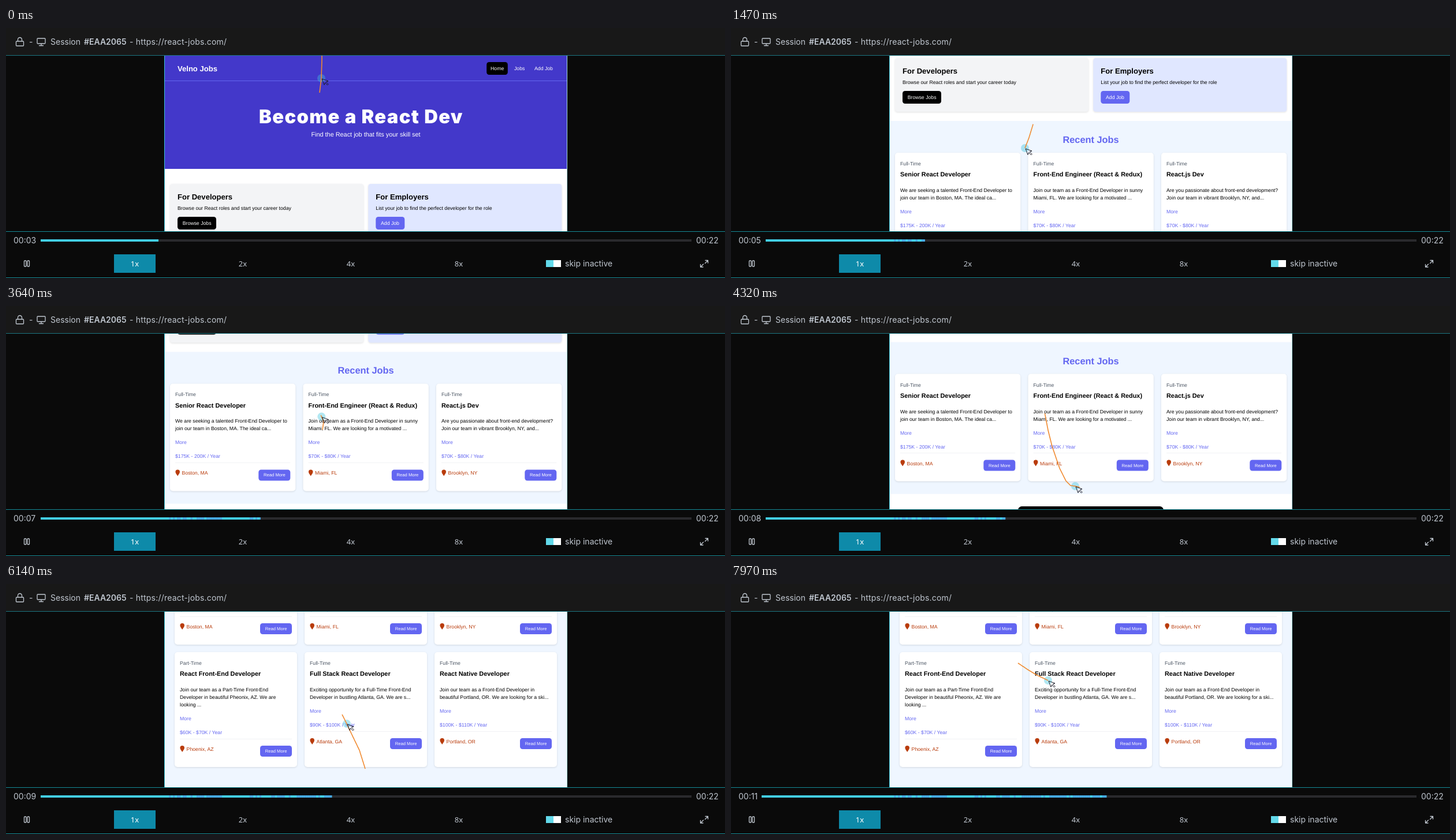
An HTML page for the animation above (8 s loop, 1245 px wide and 433 px high).

```html
<!DOCTYPE html>
<html lang="en">
<head>
<meta charset="utf-8">
<title>Session replay</title>
<style>
html, body { margin: 0; width: 100%; height: 100%; overflow: hidden; background: #0a0a0a; }
svg { display: block; width: 1245px; height: 433px; }
text { white-space: pre; }
.page text { font-family: "Liberation Sans", Arial, sans-serif; text-rendering: geometricPrecision; }
.ui text { font-family: Inter, sans-serif; font-size: 14px; fill: #c0c7d0; }
.ui .speed { font-family: "Noto Sans", sans-serif; font-size: 13px; text-anchor: middle; }
.icon { fill: none; stroke: #c0c7d0; stroke-width: 1.3; stroke-linecap: round; stroke-linejoin: round; }
.card { filter: drop-shadow(0 1.5px 1.5px rgba(0,0,0,.12)); }
</style>
</head>
<body>
<svg id="stage" viewBox="0 0 1245 433"></svg>
<script>
const REM = 8.71, LOOP = 8000, STEP = 70;
const INDIGO = '#6366f1', PURPLE = '#4338ca', SKY = '#eff6ff', RUST = '#b93c0c', TEAL = '#148a96';

const rect = (x, y, w, h, fill, r = 0, extra = '') =>
  `<rect x="${x}" y="${y}" width="${w}" height="${h}" rx="${r}" fill="${fill}" ${extra}/>`;
const text = (x, y, s, size = REM, fill = '#000', extra = '') =>
  `<text x="${x}" y="${y}" font-size="${size}" fill="${fill}" ${extra}>${s.replace(/&/g, '&amp;')}</text>`;
const bold = 'font-weight="700"', mid = 'text-anchor="middle"';
const label = (x, y, s, extra) => `<text x="${x}" y="${y}" ${extra || ''}>${s}</text>`;
const icon = d => `<path class="icon" d="${d}"/>`;

function nav(active) {
  const links = [['Home', 839, 23.2], ['Jobs', 880, 18.2], ['Add Job', 915, 32.5]];
  return rect(275, 48, 697, 43.5, PURPLE) + rect(275, 91, 697, 1, INDIGO) +
    text(297, 75, 'Velno Jobs', 13.07, '#fff', bold) +
    links.map(([s, x, w], i) =>
      (i === active ? rect(x - 6.8, 59, w + 13.4, 22, '#000', 4.4) : '') +
      text(x, 73, s, REM, '#fff')).join('');
}

function promo(x, fill, title, line, button, w, color) {
  return rect(x, 270, 335, 93, fill, 4.4, 'class="card"') +
    text(x + 13, 297, title, 13.07, '#000', bold) +
    text(x + 13, 314.7, line) +
    rect(x + 13, 327, w, 22, color, 4.4) +
    text(x + 21.7, 341, button, REM, '#fff');
}

function job(x, y, w, h, { type, title, lines, pay, place }) {
  const px = x + 9, right = x + w - 9, dy = (lines.length - 2) * 13;
  return rect(x, y, w, h, '#fff', 5, 'class="card"') +
    text(px, y + 22, type, REM, '#4b5563') +
    text(px, y + 41.3, title, 10.89, '#000', bold) +
    lines.map((s, i) => text(px, y + 68 + i * 13, s)).join('') +
    text(px, y + 105, 'More', REM, INDIGO, `transform="translate(0 ${dy})"`) +
    text(px, y + 129, pay, REM, INDIGO, `transform="translate(0 ${dy})"`) +
    rect(px, y + 137 + dy, w - 18, .6, '#e8eaee') +
    `<path transform="translate(${px + 4.2} ${y + 154 + dy})" fill="${RUST}" d="M0 6C-1.6 3.4-3.8 1.2-3.8-1.2A3.8 3.8 0 0 1 3.8-1.2C3.8 1.2 1.6 3.4 0 6Z"/>` +
    text(px + 11.6, y + 158 + dy, place, REM, RUST) +
    rect(right - 55, y + 149 + dy, 55, 19, INDIGO, 4.4) +
    text(right - 46.2, y + 161 + dy, 'Read More', 7.62, '#fff');
}

const entry = (type, title, lines, pay, place) => ({ type, title, lines, pay, place });
const recent = [
  entry('Full-Time', 'Senior React Developer',
    ['We are seeking a talented Front-End Developer to', 'join our team in Boston, MA. The ideal ca...'],
    '$175K - 200K / Year', 'Boston, MA'),
  entry('Full-Time', 'Front-End Engineer (React & Redux)',
    ['Join our team as a Front-End Developer in sunny', 'Miami, FL. We are looking for a motivated ...'],
    '$70K - $80K / Year', 'Miami, FL'),
  entry('Full-Time', 'React.js Dev',
    ['Are you passionate about front-end development?', 'Join our team in vibrant Brooklyn, NY, and...'],
    '$70K - $80K / Year', 'Brooklyn, NY')
];
const older = [
  entry('Part-Time', 'React Front-End Developer',
    ['Join our team as a Part-Time Front-End', 'Developer in beautiful Pheonix, AZ. We are', 'looking ...'],
    '$60K - $70K / Year', 'Phoenix, AZ'),
  entry('Full-Time', 'Full Stack React Developer',
    ['Exciting opportunity for a Full-Time Front-End', 'Developer in bustling Atlanta, GA. We are s...'],
    '$90K - $100K / Year', 'Atlanta, GA'),
  entry('Full-Time', 'React Native Developer',
    ['Join our team as a Front-End Developer in', 'beautiful Portland, OR. We are looking for a ski...'],
    '$100K - $110K / Year', 'Portland, OR')
];

const homePage = rect(275, 48, 697, 700, '#fff') + rect(275, 91, 697, 153, PURPLE) + nav(0) +
  text(438, 165, 'Become a React Dev', 32.67, '#fff',
    'style="font-family:Inter,sans-serif;font-weight:900;letter-spacing:1.4px"') +
  text(623, 187.7, 'Find the React job that fits your skill set', 10.89, '#fff', mid) +
  promo(284, '#f3f4f6', 'For Developers', 'Browse our React roles and start your career today', 'Browse Jobs', 67, '#000') +
  promo(627.3, '#e0e7ff', 'For Employers', 'List your job to find the perfect developer for the role', 'Add Job', 50, INDIGO) +
  rect(275, 379, 697, 263, SKY) +
  text(623, 417, 'Recent Jobs', 16.33, INDIGO, bold + ' ' + mid) +
  recent.map((j, i) => job(284 + i * 230.5, 434, 217.3, 186, j)).join('') +
  rect(497, 663.5, 252, 30.5, '#000', 6.5, 'id="viewAll"') +
  text(623, 682, 'View All Jobs', REM, '#fff', mid);

const jobsPage = rect(275, 48, 697, 600, SKY) + nav(1) +
  text(623, 129, 'Browse Jobs', 16.33, INDIGO, bold + ' ' + mid) +
  recent.map((j, i) => job(292 + i * 225, 146, 212, 186, j)).join('') +
  older.map((j, i) => job(292 + i * 225, 345, 212, 199, j)).join('');

// Event marks along the timeline, with one quiet stretch
let marks = '';
for (let i = 0; i < 110; i++) {
  const x = 279 + i * 3.4, r = Math.abs(Math.sin(i * 12.9898) * 43758.5453) % 1;
  if (r > .4 && (x < 373 || x > 421)) marks += rect(x, 366, 3, 4, '#4a8fe0', 0, 'opacity=".65"');
}

document.getElementById('stage').innerHTML = `
<defs>
  <clipPath id="view"><rect x="275" y="48" width="697" height="304"/></clipPath>
  <clipPath id="played"><rect id="playedBox" y="366" height="4"/></clipPath>
</defs>
${rect(0, 0, 1245, 433, '#0a0a0a')}
<g class="page" clip-path="url(#view)">
  <g id="home">${homePage}</g>
  <g id="jobs">${jobsPage}</g>
  <circle id="halo" r="7" fill="#3ec3dc" opacity=".4"/>
  <path id="trail" fill="none" stroke="#f08a30" stroke-width="1.6" stroke-linejoin="round"/>
  <path id="arrow" fill="none" stroke="#1c1c28" stroke-width="1" stroke-linejoin="round"
    d="M1 1L5 11.5L6.7 7.7L10.6 12L12.2 10.4L8.2 6.4L12 5Z"/>
</g>
<g class="ui">
  ${rect(0, 0, 1245, 47, '#181818')}
  ${rect(0, 47, 1245, 1, '#1b7580')}
  ${rect(274, 48, 1, 304, '#3ac6da')}${rect(971, 48, 1, 304, '#a6dbe4')}
  ${rect(0, 352, 1245, 1, TEAL)}${rect(0, 432, 1245, 1, TEAL)}
  ${icon('M18.5 23h11a1 1 0 0 1 1 1v6a1 1 0 0 1-1 1h-11a1 1 0 0 1-1-1v-6a1 1 0 0 1 1-1zM20.5 23v-3a3.5 3.5 0 0 1 7 0v3')}
  ${label(40, 29, '-')}
  ${icon('M55 18h12a1 1 0 0 1 1 1v7a1 1 0 0 1-1 1H55a1 1 0 0 1-1-1v-7a1 1 0 0 1 1-1zM61 27v3.5M57.5 30.5h7')}
  ${label(77, 29, 'Session')}
  ${label(135, 29, '#EAA2065', 'font-weight="600"')}
  ${label(214, 29, '- https://react-jobs.com/', 'letter-spacing=".2"')}
  ${label(13, 373, '', 'id="clock"')}
  ${label(1195, 373, '00:22')}
  ${rect(0, 366, 0, 4, '#2a2a2d', 0, 'id="track"')}
  <g clip-path="url(#played)">${rect(50, 366, 1140, 4, '#42cee6')}${marks}</g>
  ${icon('M32.5 403h1.5a1 1 0 0 1 1 1v8a1 1 0 0 1-1 1h-1.5a1 1 0 0 1-1-1v-8a1 1 0 0 1 1-1zM38 403h1.5a1 1 0 0 1 1 1v8a1 1 0 0 1-1 1H38a1 1 0 0 1-1-1v-8a1 1 0 0 1 1-1z')}
  ${rect(187, 392, 72, 32, '#0e8aa9')}
  ${[1, 2, 4, 8].map((n, i) => label(223 + i * 187, 413, n + 'x', 'class="speed"' + (i ? '' : ' style="fill:#fff"'))).join('')}
  ${rect(935, 402, 13, 12, '#62d9ea')}${rect(948, 402, 13, 12, '#fff')}
  ${label(968, 413, 'skip inactive')}
  ${icon('M1211 402.5h4.5v4.5M1215.5 402.5l-5 5M1207 414h-4.5v-4.5M1202.5 414l5-5')}
</g>`;

// Pointer path: time, x, y
const path = [
  [-400, 547, 20], [-150, 547, 55], [0, 546, 87], [60, 543, 112], [300, 537, 140],
  [980, 523, 167], [1250, 516, 190], [1440, 509, 208], [2590, 509, 208],
  [2800, 525, 222], [3100, 548, 215], [3400, 550, 200], [3800, 543, 184],
  [3950, 549, 215], [4050, 556, 243], [4130, 569, 281], [4190, 580, 303],
  [4250, 588, 311], [4310, 596, 312], [4370, 604, 314], [4450, 622, 320],
  [5690, 622, 320], [5840, 612, 288], [5990, 599, 261], [6130, 590, 242],
  [6190, 582, 226], [6600, 530, 180], [7100, 480, 140], [7450, 497, 137],
  [7700, 515, 149], [7850, 530, 158], [7950, 549, 167]
];
const homeScroll = [[250, 0], [840, 218], [1500, 218], [2050, 325], [3430, 325], [3800, 272], [4160, 272], [4460, 361]];
const jobsScroll = [[5300, 0], [5960, 227], [6500, 227], [6850, 118], [7350, 118], [7800, 227]];

const linear = u => u, smooth = u => u * u * (3 - 2 * u);
function sample(keys, t, k, ease) {
  if (t <= keys[0][0]) return keys[0][k];
  const i = keys.findIndex(p => p[0] > t);
  if (i < 0) return keys[keys.length - 1][k];
  const a = keys[i - 1], b = keys[i];
  return a[k] + (b[k] - a[k]) * ease((t - a[0]) / (b[0] - a[0]));
}
const point = t => [sample(path, t, 1, linear), sample(path, t, 2, linear)];

const el = {};
for (const id of ['home', 'jobs', 'halo', 'trail', 'arrow', 'viewAll', 'clock', 'track', 'playedBox'])
  el[id] = document.getElementById(id);
const set = (id, attrs) => { for (const k in attrs) el[id].setAttribute(k, attrs[k]); };

function draw(now) {
  const shift = now > 3400 ? 30 : 0;
  const t = Math.floor((now + shift) / STEP) * STEP - shift;
  const onJobs = t >= 5080;

  set('home', { display: onJobs ? 'none' : 'inline', transform: `translate(0 ${-sample(homeScroll, t, 1, smooth)})` });
  set('jobs', { display: onJobs ? 'inline' : 'none', transform: `translate(0 ${-sample(jobsScroll, t, 1, smooth)})` });
  set('viewAll', { fill: t >= 4440 ? '#374151' : '#000', stroke: t >= 4940 ? '#1d63c8' : 'none' });

  const [x, y] = point(t), click = t >= 4940 && t < 5150;
  set('halo', { cx: x, cy: y, r: click ? 6 : 7, opacity: click ? .3 : .4 });
  set('arrow', { transform: `translate(${x} ${y})` });
  const tail = [];
  for (let s = t - 500; s <= t + 60; s += 10) tail.push(point(s).map(v => v.toFixed(1)).join(' '));
  set('trail', { d: 'M' + tail.join('L') });

  const sec = 3.94 + .957 * t / 1000, whole = Math.floor(sec);
  const x0 = whole > 10 ? 53 : whole > 9 ? 56.5 : 60;
  el.clock.textContent = '00:' + String(whole).padStart(2, '0');
  set('track', { x: x0, width: 1187 - x0 });
  set('playedBox', { x: x0, width: (1187 - x0) * (sec + .04) / 22 });
}

const start = performance.now();
(function tick() {
  draw((performance.now() - start) % LOOP);
  requestAnimationFrame(tick);
})();
</script>
</body>
</html>
```
